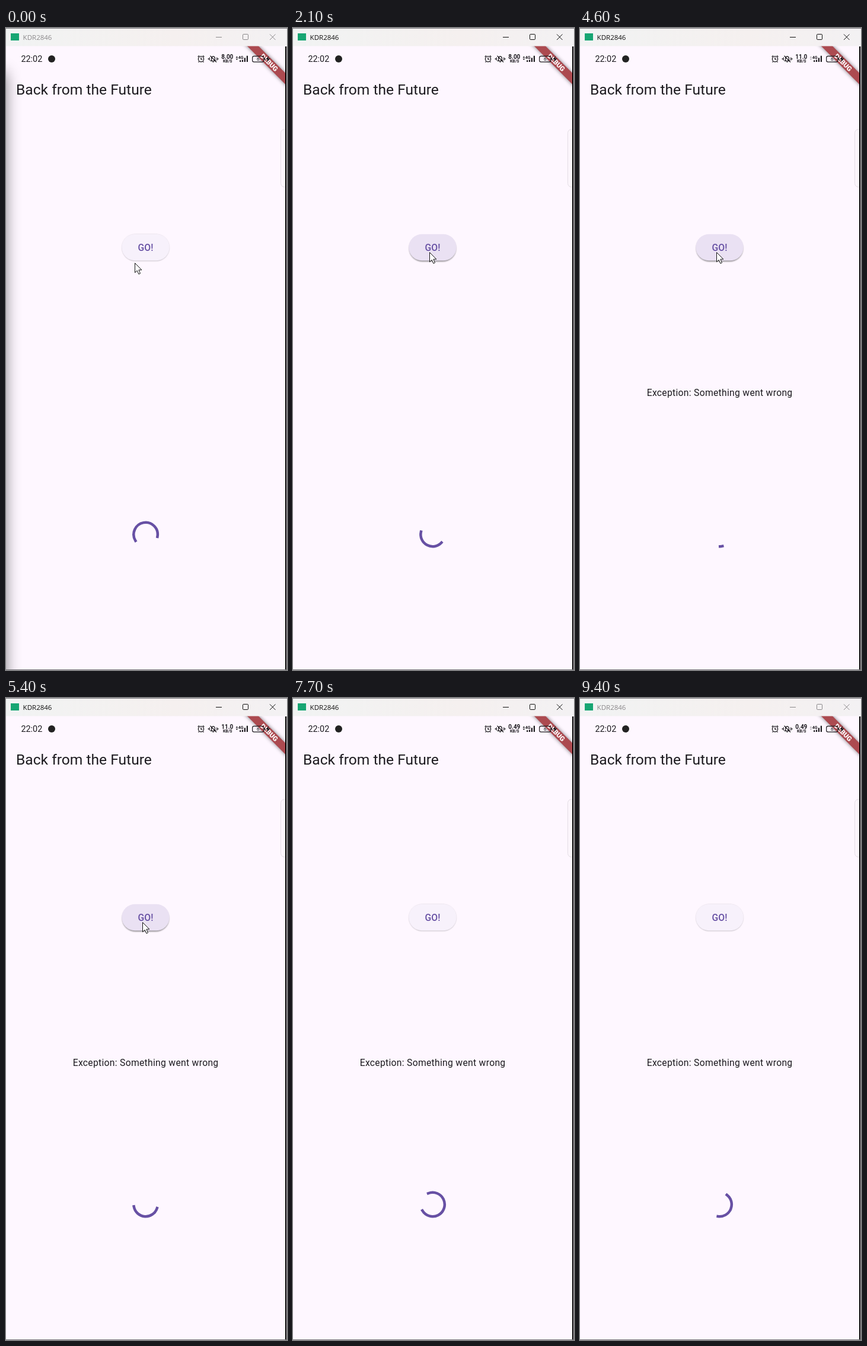
An HTML page for the animation above (9500 ms loop, 474 by 1080 pixels).

```html
<!DOCTYPE html>
<html lang="en">
<head>
<meta charset="utf-8">
<title>Back from the Future</title>
<style>
  html, body { margin: 0; width: 100%; height: 100%; overflow: hidden; background: #fef7ff; }
  svg { display: block; width: 474px; height: 1080px; }
  text { font-family: Roboto, "Noto Sans", sans-serif; fill: #1d1b20; }
  .caption { font-family: "Open Sans", "Noto Sans", sans-serif; font-size: 11.5px; fill: inherit; }
  .mid { text-anchor: middle; }
  .line { fill: none; stroke: #1b191d; }
</style>
</head>
<body>
<svg viewBox="0 0 474 1080">
  <defs>
    <clipPath id="screen"><rect y="30" width="471" height="1049"/></clipPath>
    <linearGradient id="bar">
      <stop offset="0" stop-color="#f1f3f3"/>
      <stop offset=".6" stop-color="#f5f0ef"/>
      <stop offset="1" stop-color="#f3f1f3"/>
    </linearGradient>
    <filter id="soft" x="-100%" y="-10%" width="300%" height="120%"><feGaussianBlur stdDeviation="13"/></filter>
    <filter id="glow" x="-20%" y="-100%" width="140%" height="300%"><feGaussianBlur stdDeviation="3"/></filter>
    <filter id="lift" x="-20%" y="-30%" width="140%" height="170%"><feGaussianBlur stdDeviation="1.3"/></filter>
  </defs>

  <rect width="474" height="1080" fill="#fef7ff"/>

  <!-- app -->
  <g clip-path="url(#screen)">
    <text x="17" y="112" font-size="24.6">Back from the Future</text>

    <rect x="463.5" y="170.5" width="20" height="97" rx="6" fill="#fcf6fc" stroke="#e4dde5"/>

    <g id="button">
      <rect id="shade" x="196" y="348" width="79" height="44" rx="22" filter="url(#lift)"/>
      <rect id="face" x="195.3" y="346.8" width="80.4" height="44.4" rx="22.2"/>
      <text id="label" class="mid" x="235.6" font-size="15.7" font-weight="500" letter-spacing=".11" style="fill:#6750a4">GO!</text>
    </g>

    <text id="error" class="mid" x="235.6" y="619.4" font-size="15.72" letter-spacing=".28">Exception: Something went wrong</text>
    <path id="spinner" fill="none" stroke="#6750a4" stroke-width="4.5" stroke-linecap="square"/>

    <g transform="translate(471 31) rotate(45)">
      <rect x="-60" y="31.4" width="120" height="13.5" opacity=".5" filter="url(#glow)"/>
      <rect x="-60" y="31.4" width="120" height="13.5" fill="#ac4a50"/>
      <text class="mid" y="42.2" font-size="11.4" font-weight="900" style="fill:#fff">DEBUG</text>
    </g>

    <!-- status bar -->
    <text x="25.4" y="57" font-size="14.4">22:02</text>
    <circle cx="77" cy="52" r="6" fill="#222"/>
    <g class="line" stroke-width="1.3">
      <circle cx="329" cy="52.3" r="4.6"/>
      <path d="M329 49.5V52.6H331.3M323.6 48.6L326 46.6M334.4 48.6L332 46.6M325.5 56.5L324.5 57.7M332.5 56.5L333.5 57.7"/>
      <path d="M345.5 55.3H353.5L352.4 53.6V51Q352.3 48 349.5 47.7Q346.7 48 346.6 51V53.6ZM348.3 57.2H350.7M344.5 46.8L355 57.6"/>
      <path d="M343.2 49.5V54.5M341.4 51V53M355.8 49.5V54.5M357.6 51V53"/>
    </g>
    <text id="speed" class="mid" x="373.3" y="52.4" font-size="10" font-weight="700"></text>
    <text class="mid" x="373.7" y="58.3" font-size="6.8" font-weight="700">KB/S</text>
    <path id="arrows" d="M387.6 50L389.4 47.4L391.2 50ZM387.6 51.4L389.4 54L391.2 51.4Z" fill="#1b191d"/>
    <text x="391.8" y="52.2" font-size="7" font-weight="700">4G</text>
    <path d="M395.2 57V54.2M399 57V53.4M402.9 57V50.2M406.9 57V46.8" class="line" stroke-width="2.2"/>
    <rect x="415.7" y="47.3" width="19.2" height="9.8" rx="2.6" class="line" stroke-width="1.2"/>
    <text class="mid" x="425.2" y="55" font-size="7.5">6</text>
    <path d="M436.5 50.3V54" class="line" stroke-width="1.6"/>
    <path d="M442.8 47L438.4 52.8H441.2L440.2 57.4L445.6 51.2H442.4Z" fill="#1b191d"/>

    <rect id="edge" x="-70" y="75" width="69" height="1150" opacity=".5" filter="url(#soft)"/>
  </g>

  <!-- window frame -->
  <rect width="474" height="30.5" fill="url(#bar)"/>
  <rect x="8" y="9" width="14" height="12" fill="#17a673"/>
  <g id="chrome">
    <text class="caption" x="28.6" y="19.7">KDR2846</text>
    <path d="M354 15.5H364M445 10.5L454.5 20M454.5 10.5L445 20" fill="none" stroke-width="1"/>
    <rect x="399.5" y="10.5" width="9" height="9" rx="1.3" fill="none"/>
  </g>
  <path d="M0 .5H474M0 1079.5H474" stroke="#77757a"/>
  <rect x="471" y="31" width="2.2" height="1048"/>

  <path id="cursor" d="M0 0V16L3.7 12.6L6.4 18.6L9 17.4L6.4 11.5H11.4Z" fill="#fff" stroke="#111" stroke-width="1"/>
</svg>

<script>
const LOOP = 9500, STEP = 100;
const part = id => document.getElementById(id);
const set = (id, attrs) => Object.entries(attrs).forEach(([k, v]) => part(id).setAttribute(k, v));
const clamp = v => Math.min(1, Math.max(0, v));
const ramp = (t, from, to) => clamp((t - from) / (to - from));
const mix = (a, b, k) => a + (b - a) * k;
const show = (id, on) => { part(id).style.display = on ? "" : "none"; };

// cubic-bezier(.4, 0, .2, 1)
function fastOutSlowIn(x) {
  let lo = 0, hi = 1;
  for (let i = 0; i < 24; i++) {
    const s = (lo + hi) / 2, u = 1 - s;
    if (1.2 * s * u * u + 0.6 * s * s * u + s * s * s < x) lo = s; else hi = s;
  }
  return lo * lo * (3 - 2 * lo);
}

function spinnerPath(t) {
  const cycle = (t + 815) / 1333 % 1;
  const turn = (t + 838) / 2222 % 1;
  const head = 270 * fastOutSlowIn(clamp(cycle * 2));
  const tail = 270 * fastOutSlowIn(clamp(cycle * 2 - 1));
  const start = -90 + tail + 360 * turn + 90 * cycle;
  const sweep = Math.max(head - tail, 0.1);
  const point = deg => {
    const a = deg * Math.PI / 180;
    return `${(235.6 + 20.2 * Math.cos(a)).toFixed(3)} ${(852 + 20.2 * Math.sin(a)).toFixed(3)}`;
  };
  return `M${point(start)}A20.2 20.2 0 ${sweep > 180 ? 1 : 0} 1 ${point(start + sweep)}`;
}

function cursorAt(t) {
  const enter = ramp(t, 0, 400), leave = ramp(t, 5800, 6100) ** 2;
  return [
    mix(217.5, 230.5, enter) - 205 * leave,
    mix(395.5, 377.5, enter) + 60 * leave
  ];
}

function draw(t) {
  const hover = ramp(t, 100, 400) - ramp(t, 5900, 6100);
  const failed = t >= 2500;
  const active = t >= 500 && t < 9300;
  const ink = active ? "#111" : "#8b898b";

  set("spinner", { d: spinnerPath(t) });
  set("face", { fill: `rgb(${mix(247, 234, hover)},${mix(241, 225, hover)},${mix(251, 243, hover)})` });
  set("shade", { opacity: mix(0.34, 0.42, hover), y: mix(347.6, 349, hover) });
  set("label", { y: failed ? 375.2 : 374.6 });
  set("chrome", { fill: ink, stroke: ink });
  part("chrome").firstElementChild.setAttribute("stroke", "none");
  set("cursor", { transform: `translate(${cursorAt(t)})` });
  set("arrows", { opacity: (t >= 3600 && t < 5000) || t >= 8600 ? 0.35 : 1 });
  part("speed").textContent = t < 2400 ? "8.00" : t < 6200 ? "11.0" : "0.49";
  show("error", failed);
  show("edge", t < 100);
  show("cursor", t < 6200);
}

function tick() {
  const t = performance.now() % LOOP;
  draw(Math.floor(t / STEP) * STEP);
  requestAnimationFrame(tick);
}
tick();
</script>
</body>
</html>
```
